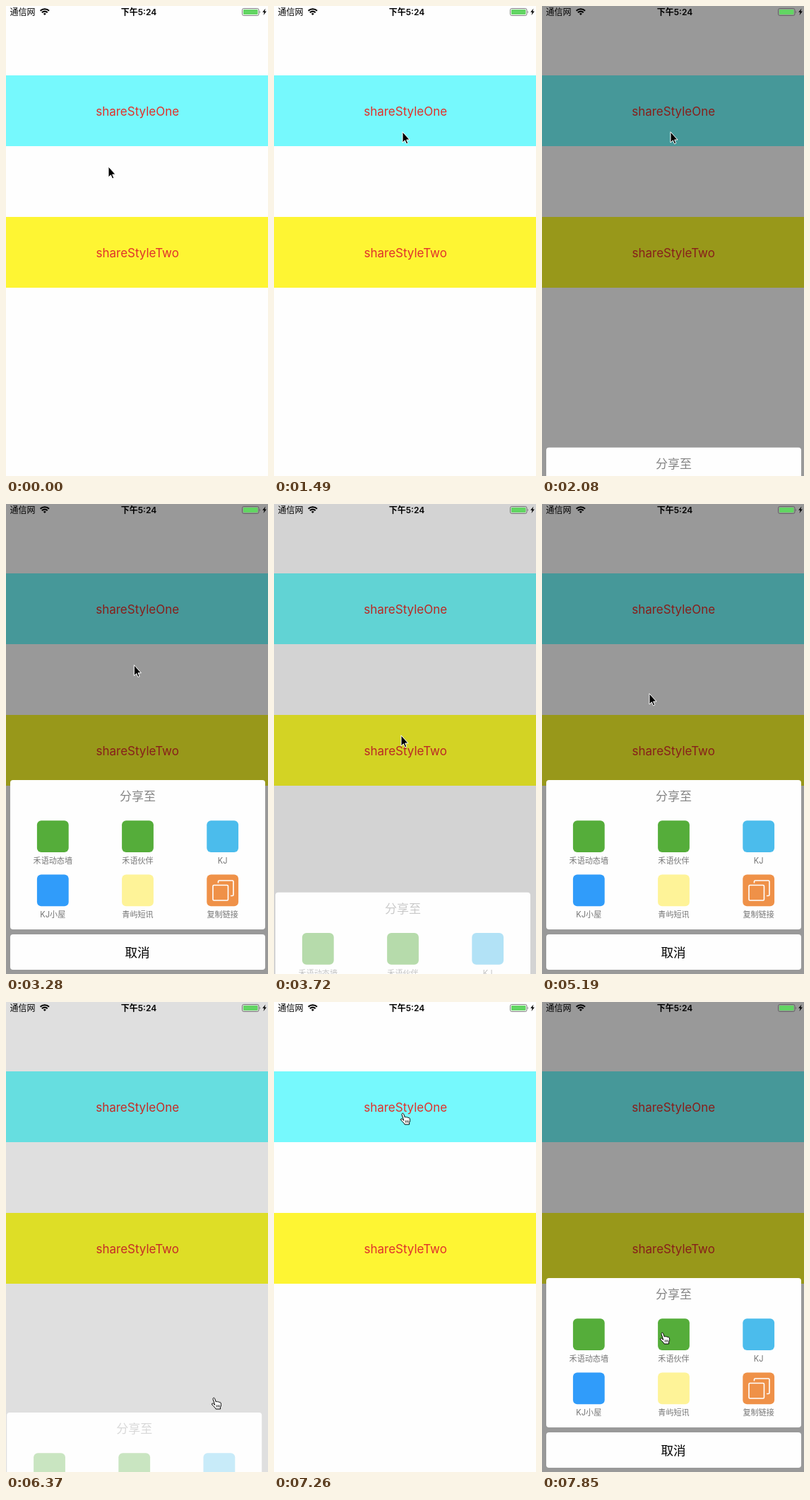
Recreate the animation shown at these times as an HTML page. Size 371 px wide and 664 px high, loop 8000 ms.

```html
<!DOCTYPE html>
<html lang="zh">
<head>
<meta charset="utf-8">
<style>
html, body { margin: 0; width: 100%; height: 100%; overflow: hidden; background: #fff; }
svg { display: block; width: 371px; height: 664px; }
text { font-family: Inter, "Noto Sans CJK SC", "Noto Sans CJK", sans-serif; text-anchor: middle; }
.one { fill: #76f9fd; }
.two { fill: #fef533; }
.dimmed .one { fill: #74fdff; }
.dimmed .two { fill: #fdfd2b; }
.link { font-size: 17px; fill: #e0322c; }
.title { font-size: 17px; fill: #858585; }
.label { font-size: 11.1px; fill: #757575; }
.cancel { font-size: 17.6px; }
.status { font-size: 12px; }
</style>
</head>
<body>
<svg viewBox="0 0 371 664">
  <g id="page">
    <rect width="371" height="664" fill="#fefefe"/>
    <rect class="one" y="98" width="371" height="100"/>
    <rect class="two" y="298" width="371" height="100"/>
    <text class="link" x="186.2" y="154.7">shareStyleOne</text>
    <text class="link" x="186.2" y="354.7">shareStyleTwo</text>
  </g>
  <rect id="dim" width="371" height="664"/>

  <g id="sheet">
    <rect x="6" y="390" width="361" height="211" rx="4" fill="#fefefe"/>
    <rect x="6" y="608" width="361" height="50" rx="4" fill="#fefefe"/>
    <g id="content">
      <text class="title" x="186.5" y="419">分享至</text>
      <g id="items"></g>
      <g fill="none" stroke="#fff" stroke-width="1.6">
        <rect x="293" y="538.5" width="21.5" height="21.5" rx="1.5"/>
        <path d="M300.5 535.5v-2q0-1.5 1.5-1.5h18.5q1.5 0 1.5 1.5v18.5q0 1.5-1.5 1.5h-2.5"/>
      </g>
      <text class="cancel" x="186" y="639.5">取消</text>
    </g>
  </g>

  <text class="status" x="23.5" y="12.5">通信网</text>
  <text class="status" x="188" y="12.5" font-weight="600">下午5:24</text>
  <g fill="none" stroke="#000" stroke-width="2.1">
    <path d="M48.6 6.8a9 9 0 0 1 12.4 0M50.9 9.2a5.6 5.6 0 0 1 7.8 0"/>
    <path d="M54.8 13l-2-2.1a3 3 0 0 1 4 0z" fill="#000" stroke="none"/>
  </g>
  <rect x="334.5" y="3.5" width="23.5" height="10" rx="2.2" fill="none" stroke="#555" stroke-opacity=".75"/>
  <rect x="336" y="5" width="20.5" height="7" rx="1" fill="#62d563"/>
  <path d="M359.3 6.8q1.7 1.7 0 3.5z" fill="#555"/>
  <path d="M367.5 3.5l-4.3 5.2h2.5l-1.2 4.3 4.4-5.5h-2.6z"/>

  <g id="arrow">
    <path d="M1 .8V16l3.4-3.2 2.1 5 2.3-.9-2.1-4.9h4.4z" stroke="#fff"/>
  </g>
  <g id="hand" stroke="#000" stroke-linejoin="round">
    <path fill="#fff" d="M5.3 9.7L3.1 3.3C2.6 1.3 4.8.3 5.6 2.3L7.3 7C7.9 6 9.3 6.1 9.7 7.1 10.3 6.3 11.6 6.6 11.9 7.7 12.7 7 14 7.4 14.2 8.6 14.9 11.3 14.7 12.5 13.6 14.4V17H7.1C6.3 14.8 3.9 13.4 1.9 11 .9 9.5 2.2 8.3 3.6 9.3L5.7 11.4z"/>
    <path d="M8.3 11.3v3.2M10.3 11.3v3.2M12.2 11.3v3.2" stroke-width=".8"/>
  </g>
</svg>
<script>
const $ = id => document.getElementById(id);
const LOOP = 8000, TICKS = 54;

const items = [
  ['#55ad3a', '禾语动态墙'], ['#55ad3a', '禾语伙伴'], ['#4bbcec', 'KJ'],
  ['#309cfa', 'KJ小屋'], ['#fef398', '青屿短讯'], ['#ef9148', '复制链接'],
];
$('items').innerHTML = items.map(([color, name], i) => {
  const x = 66.3 + i % 3 * 120.2, y = 447.3 + (i > 2) * 76.2;
  return `<rect x="${x - 22.4}" y="${y}" width="44.8" height="44.8" rx="6" fill="${color}"/>
    <text class="label" x="${x}" y="${y + 60.7}">${name}</text>`;
}).join('');

// All times below are in ticks: the screen refreshes 54 times per loop.
const SLIDE = 2.025, HAND_FROM = 38;
const visits = [[13.51, 23.88], [29.64, 41.72], [50.7, 99]]; // [open, close]
const pointer = [
  [0, 144, 226], [1, 143, 226], [7, 181, 178], [9, 181, 178], [10, 181, 177],
  [21, 181, 177], [24, 179, 326], [25, 179, 326], [28, 171, 179], [30, 171, 179],
  [35, 151, 267], [36, 149, 276], [37, 149, 276], [41, 290, 558], [45, 290, 558],
  [46, 211, 360], [47, 211, 360], [49, 178, 156], [51, 178, 156], [53, 166, 466],
];

function ease(t) {
  t = Math.min(1, Math.max(0, t));
  return t * t * (3 - 2 * t);
}

function pointerAt(t) {
  const i = Math.max(1, pointer.findIndex(p => p[0] >= t));
  const [t0, x0, y0] = pointer[i - 1], [t1, x1, y1] = pointer[i];
  const k = (t - t0) / (t1 - t0);
  return [x0 + (x1 - x0) * k, y0 + (y1 - y0) * k];
}

function draw(t) {
  const [open, close] = visits.findLast(v => t >= v[0]) || [99, 99];
  const rise = ease((t - open) / SLIDE), fall = ease((t - close) / SLIDE);
  const shown = t >= open ? 1 - fall : 0;
  $('page').classList.toggle('dimmed', shown > 0);
  $('dim').setAttribute('opacity', 0.4 * shown);
  $('content').setAttribute('opacity', shown);
  $('sheet').setAttribute('visibility', shown > 0 ? 'visible' : 'hidden');
  $('sheet').setAttribute('transform', `translate(${-6.9 * fall} ${274 * (1 - rise + fall)})`);

  const hand = t >= HAND_FROM;
  $('arrow').setAttribute('visibility', hand ? 'hidden' : 'visible');
  $('hand').setAttribute('visibility', hand ? 'visible' : 'hidden');
  $(hand ? 'hand' : 'arrow').setAttribute('transform', `translate(${pointerAt(t)})`);
}

function loop() {
  const ms = performance.now() % LOOP;
  draw(Math.min(TICKS - 1, Math.floor((ms + 10) * TICKS / LOOP)));
  requestAnimationFrame(loop);
}
loop();
</script>
</body>
</html>
```
